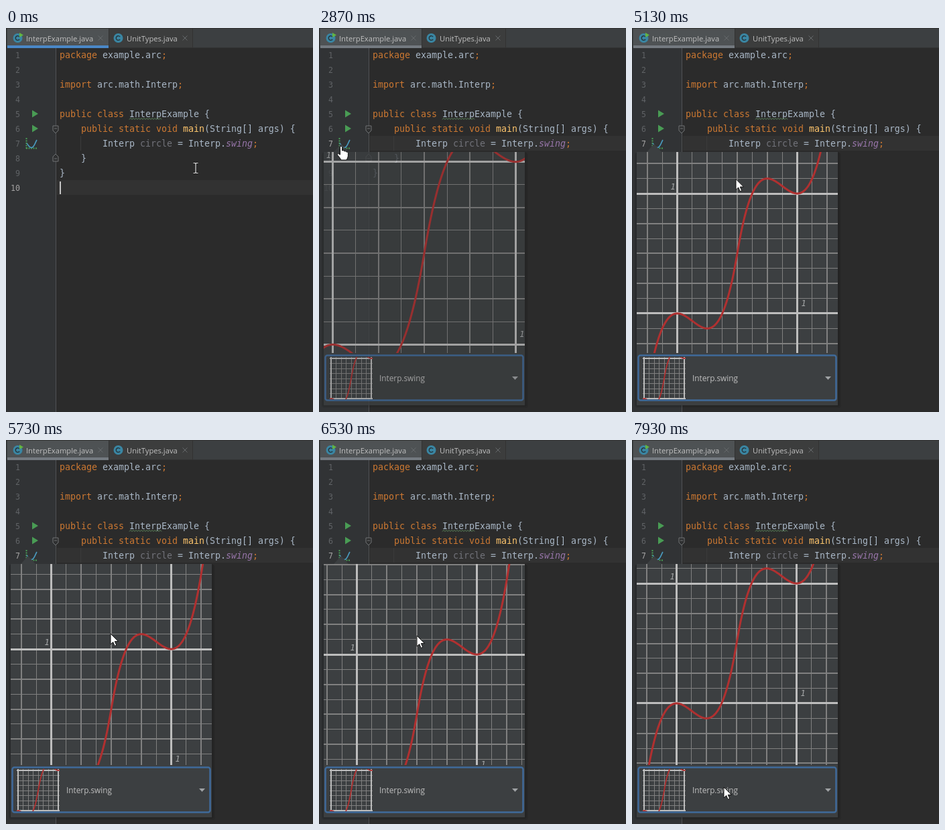
Write an HTML page that moves like this. It is 458 px wide and 573 px high and loops after 8000 ms.

```html
<!DOCTYPE html>
<html lang="en">
<head>
<meta charset="utf-8">
<title>Interp preview</title>
<style>
  html, body { margin: 0; width: 100%; height: 100%; overflow: hidden; background: #2b2b2b; }
  #stage { display: block; width: 458px; height: 573px; }
  text { white-space: pre; }
  .code { font: 13.29px "DejaVu Sans Mono", monospace; fill: #a9b7c6; }
  .num { font: 11.6px "DejaVu Sans Mono", monospace; fill: #606366; text-anchor: end; }
  .num.on { fill: #a4a3a3; }
  .ui { font: 11.2px "Open Sans", sans-serif; fill: #c0c0c0; }
  #choice { font-size: 11.8px; }
  .tick { font: italic 12px "DejaVu Sans Mono", monospace; fill: #a6a8a9; }
  .kw { fill: #cc7832; }
  .fn { fill: #ffc66d; }
  .dim { fill: #72737a; }
  .field { fill: #9876aa; font-style: italic; }
  .line { fill: none; }
  .grid { fill: none; stroke: #808080; shape-rendering: crispEdges; }
  .axis { stroke: #bdbdbd; }
  .curve { fill: none; stroke: #b03030; }
</style>
</head>
<body>
<svg id="stage" viewBox="0 0 458 573">
  <defs>
    <g id="class-icon">
      <circle r="7" fill="#3a86a3"/>
      <path d="M2.6 -1.8A3.2 3.2 0 1 0 2.6 1.8" fill="none" stroke="#26333a" stroke-width="1.4"/>
    </g>
    <path id="close" d="M-3.5 -3.5L3.5 3.5M3.5 -3.5L-3.5 3.5" stroke="#66696b"/>
    <path id="run" d="M-4 -5.5L5 0L-4 5.5Z" fill="#499c54"/>
    <g id="fold" class="line" stroke="#707375">
      <path d="M-4 -5H4V2L0 6L-4 2ZM-2 -1H2" fill="#2f3031"/>
    </g>
    <path id="beam-shape" d="M-3.5 -7.5H-1L0 -6.5L1 -7.5H3.5M0 -6.5V6.5M-3.5 7.5H-1L0 6.5L1 7.5H3.5"/>
  </defs>

  <rect width="458" height="573" fill="#2b2b2b"/>
  <rect y="29" width="75" height="544" fill="#313335"/>
  <rect id="row" x="76" width="382" height="22" fill="#323232"/>
  <rect x="74" y="29" width="1" height="544" fill="#505355"/>
  <rect width="458" height="29" fill="#3c3f41"/>
  <rect x="153" width="125" height="29" fill="#3c3d3d"/>
  <rect y="29" width="458" height="1" fill="#323232"/>
  <rect x="2" width="151" height="29" fill="#4e5254"/>
  <path d="M0 .5H458M153.5 0V29M278.5 0V29" stroke="#323232"/>
  <rect id="underline" x="2" y="26" width="151" height="4"/>
  <rect width="1" height="573" fill="#2a2c2d"/>

  <use href="#class-icon" x="17.5" y="15"/>
  <path d="M20 7L26 10.5L20 14Z" fill="#62b543"/>
  <use href="#class-icon" x="167.5" y="15"/>
  <text class="ui" x="30" y="20">InterpExample.java</text>
  <text class="ui" x="180" y="20">UnitTypes.java</text>
  <use href="#close" x="141" y="15"/>
  <use href="#close" x="267" y="15"/>

  <g id="numbers"></g>
  <g class="code">
    <text x="80" y="45"><tspan class="kw">package</tspan> example.arc<tspan class="kw">;</tspan></text>
    <text x="80" y="89"><tspan class="kw">import</tspan> arc.math.Interp<tspan class="kw">;</tspan></text>
    <text x="80" y="133"><tspan class="kw">public class</tspan> InterpExample {</text>
    <text x="112" y="155"><tspan class="kw">public static void</tspan> <tspan class="fn">main</tspan>(String[] args) {</text>
    <text x="144" y="177">Interp <tspan class="dim">circle</tspan> = Interp.<tspan class="field">swing</tspan><tspan class="kw">;</tspan></text>
    <text x="112" y="199">}</text>
    <text x="80" y="221">}</text>
  </g>
  <path id="squiggle" class="line" stroke="#5f8a5f"/>
  <rect x="111" y="161" width="1" height="22" fill="#3b3b3b"/>
  <use href="#run" x="43" y="128"/>
  <use href="#run" x="43" y="150"/>
  <use href="#fold" x="74" y="151"/>
  <use href="#fold" transform="translate(74 194) scale(1 -1)"/>
  <path class="line" d="M30.5 164V180M30 179.5H47" stroke="#499c54" stroke-width="2" stroke-dasharray="2 1.5"/>
  <path class="line" d="M31 172C34 175 34 178.5 38 178.5C42 178.5 43 172 46 167" stroke="#4a9cc0" stroke-width="1.6"/>
  <rect id="caret" width="2" height="19" fill="#c4c4c4"/>

  <g id="popup">
    <rect x="4" y="186" width="308" height="381" rx="4" fill="#000" opacity=".08"/>
    <rect x="5" y="185" width="305" height="380" rx="3" fill="#000" opacity=".1"/>
    <path d="M7 185H22L33 173L44 185H307V563H7Z" fill="#3c3f41"/>
    <svg id="plot" x="7" y="185" width="300" height="300"></svg>
    <rect x="9.5" y="488.5" width="295" height="67" rx="3" fill="#3c3f41" stroke="#3f6a9a" stroke-width="2.5"/>
    <svg id="thumb" x="16" y="491" width="64" height="63"></svg>
    <text id="choice" class="ui" x="90" y="527">Interp.swing</text>
    <path d="M288 520H297L292.5 525Z" fill="#a0a3a5"/>
  </g>

  <g id="pointer">
    <g id="beam" class="line">
      <use href="#beam-shape" stroke="#222" stroke-width="3"/>
      <use href="#beam-shape" stroke="#ddd" stroke-width="1.2"/>
    </g>
    <path id="arrow" d="M0 0V16L3.7 12.5L6.2 18.3L8.8 17.2L6.3 11.6H11.5Z" fill="#fff" stroke="#111"/>
    <path id="hand" d="M-1.5 13V1.5Q0 -1 1.5 1.5V7Q4 5.5 4.7 8Q7 6.8 7.6 9Q10 8 10.4 10.5V15Q10 18 8 21H0Q-2 17 -5.5 13.5Q-6 10 -1.5 13Z" fill="#fff" stroke="#111"/>
  </g>
</svg>
<script>
const $ = id => document.getElementById(id);
const LOOP = 8000;
const smooth = u => u * u * (3 - 2 * u);

// Each key is [time, x, y]; motion eases between neighbours.
const mouseKeys = [
  [0, 283, 209], [70, 283, 209], [270, 270, 183], [530, 270, 183], [600, 269, 174],
  [1300, 269, 174], [1530, 269, 131], [2130, 48, 167], [2400, 33, 176], [3170, 33, 176],
  [4000, 142, 411], [4130, 150, 431], [4770, 150, 431], [5100, 155, 225], [5730, 156, 289],
  [6530, 146, 292], [6860, 196, 227], [7200, 180, 390], [7520, 139, 352], [7930, 137, 518]
];
// Position of the unit square's centre inside the plot.
const viewKeys = [
  [0, 150, 151], [5100, 150, 151], [5730, 150, 216.5], [6530, 139, 224.5],
  [6860, 190, 157.5], [7200, 190, 157.5], [7520, 149, 118.5]
];

function at(keys, t) {
  const i = keys.findIndex(k => k[0] > t);
  if (i < 0) return keys[keys.length - 1].slice(1);
  const [a, b] = [keys[i - 1], keys[i]];
  const u = smooth((t - a[0]) / (b[0] - a[0]));
  return [1, 2].map(n => a[n] + (b[n] - a[n]) * u);
}

function swing(x) {
  const a = x <= 0.5 ? 2 * x : 2 * (x - 1);
  return x <= 0.5 ? a * a * (4 * a - 3) / 2 : a * a * (4 * a + 3) / 2 + 1;
}

function makePlot(svg, widths, labels) {
  const classes = ["grid", "grid", "grid axis", "curve"];
  svg.innerHTML = classes.map((c, i) => `<path class="${c}" stroke-width="${widths[i]}"/>`).join("") +
    (labels ? '<text class="tick">1</text><text class="tick">1</text>' : "");
  const paths = svg.querySelectorAll("path");
  const ticks = svg.querySelectorAll("text");
  const size = svg.width.baseVal.value;

  return (cx, cy, scale) => {
    const left = cx - scale / 2, bottom = cy + scale / 2, step = scale / 8;
    const d = ["", "", ""];
    const level = k => k === 0 || k === 8 ? 2 : k % 2 ? 0 : 1;
    const snap = (v, l) => widths[l] % 2 ? Math.floor(v) + 0.5 : Math.round(v);
    for (let k = -20; k <= 28; k++) {
      const l = level(k);
      d[l] += `M${snap(left + k * step, l)} 0V${size}M0 ${snap(bottom - k * step, l)}H${size}`;
    }
    let curve = "";
    for (let px = -2; px <= size + 2; px++) {
      const y = bottom - swing((px - left) / scale) * scale;
      curve += `${curve ? "L" : "M"}${px} ${y.toFixed(2)}`;
    }
    [...d, curve].forEach((path, i) => paths[i].setAttribute("d", path));
    const place = (el, x, y) => el.setAttribute("transform", `translate(${x} ${y})`);
    if (labels) {
      place(ticks[0], left - 10, bottom - scale - 6);
      place(ticks[1], left + scale + 6, bottom - 11);
    }
  };
}

$("numbers").innerHTML = Array.from({ length: 10 }, (_, i) =>
  `<text class="num" x="21" y="${45 + 22 * i}">${i + 1}</text>`).join("");
$("squiggle").setAttribute("d", "M184 136.5" + "l2 -2l2 2".repeat(12));

const drawPlot = makePlot($("plot"), [1, 2, 3, 3], true);
makePlot($("thumb"), [1, 1, 2, 1.8], false)(32, 32, 60);
const numbers = document.querySelectorAll(".num");
const show = (id, on) => { $(id).style.display = on ? "" : "none"; };
const between = (t, a, b) => t >= a && t < b;

function render(t) {
  const line = t < 930 ? 10 : 7;
  numbers.forEach((n, i) => n.classList.toggle("on", i + 1 === line));
  $("row").setAttribute("y", 29 + 22 * (line - 1));
  $("caret").setAttribute("x", line === 7 ? 263 : 80);
  $("caret").setAttribute("y", line === 7 ? 163 : 229);
  show("caret", t < 100 || between(t, 590, 1600) || between(t, 2100, 2600));
  $("underline").setAttribute("fill", t < 2660 ? "#4a88c7" : "#747a80");

  const fade = Math.min(1, Math.max(0, (t - 2660) / 260));
  $("popup").style.opacity = fade;
  show("popup", fade > 0);
  const zoom = Math.min(4, Math.max(0, Math.floor((t - 4200) / 130) + 1));
  drawPlot(...at(viewKeys, t), 272.7 * 0.9 ** zoom);

  const [x, y] = at(mouseKeys, t);
  const beam = t < 2400 && x > 75;
  const hand = !beam && x < 46 && y < 185;
  $("pointer").setAttribute("transform", `translate(${x} ${y})`);
  show("beam", beam);
  show("hand", hand);
  show("arrow", !beam && !hand);
}

const start = performance.now();
function tick() {
  render((performance.now() - start) % LOOP);
  requestAnimationFrame(tick);
}
tick();
</script>
</body>
</html>
```
